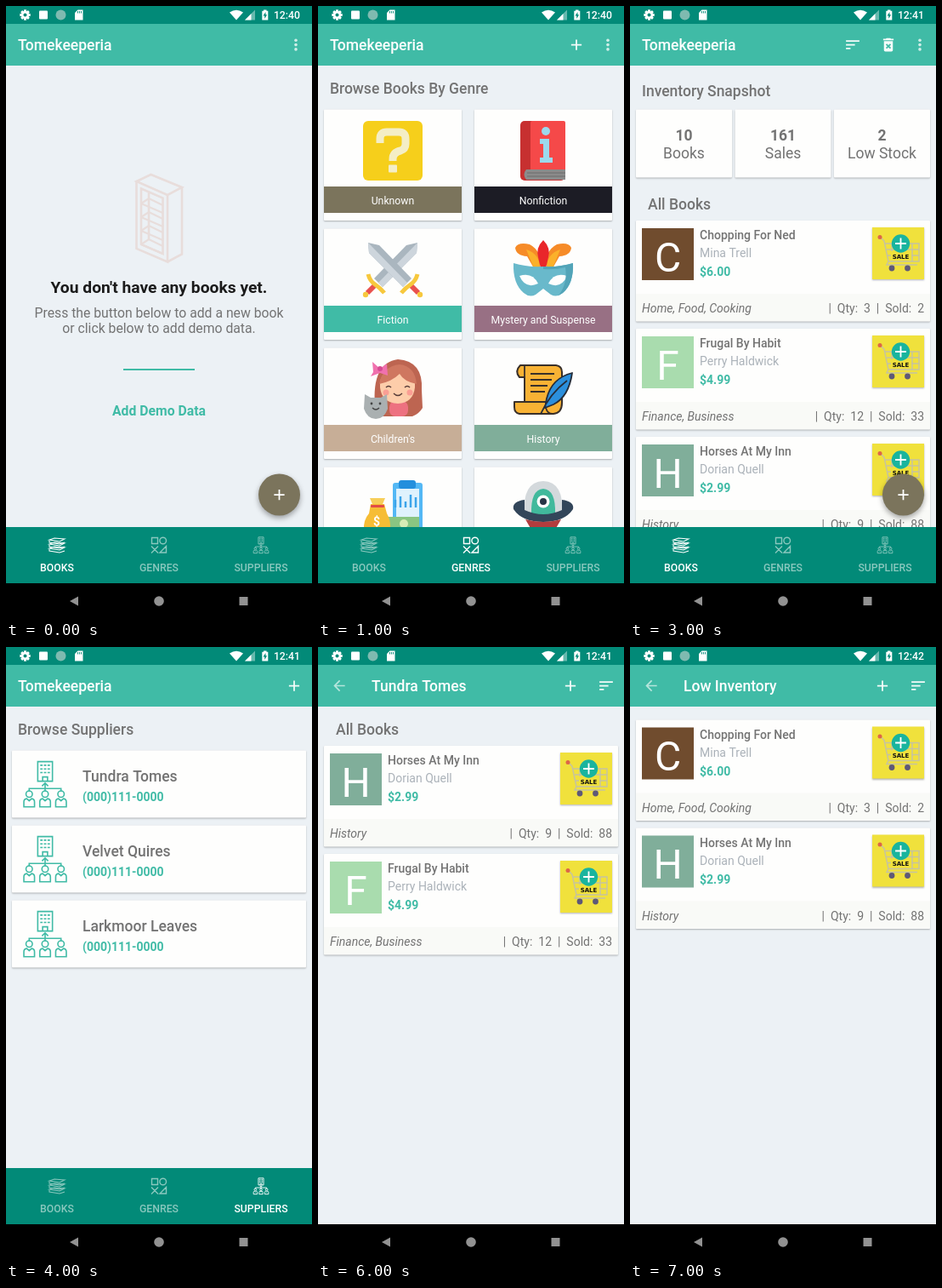
Write an HTML page with a canvas that moves like this. It is 360x720 px and loops after 8000 ms.

```html
<!DOCTYPE html>
<html lang="en">
<head>
<meta charset="utf-8">
<title>Book inventory app</title>
<style>
html, body { margin: 0; width: 100%; height: 100%; overflow: hidden; background: #000; }
canvas { display: block; width: 360px; height: 720px; }
</style>
</head>
<body>
<canvas id="stage"></canvas>
<script>
const W = 360, H = 720, SCREEN_MS = 1000;
const TEAL = '#40bba6', DARK = '#028a78', BG = '#ecf1f5', CARD = '#fefefd';
const GREY = '#737373', PALE = '#abb2b9', INK = '#1b1b1b', BLUSH = '#e8dddb', OLIVE = '#7b745c';
const APP = 'Tomekeeperia', SUPPLIER = 'Tundra Tomes', PHONE = '(000)111-0000';

const canvas = document.getElementById('stage');
const ctx = canvas.getContext('2d');
const dpr = window.devicePixelRatio || 1;
canvas.width = W * dpr;
canvas.height = H * dpr;

const ICONS = {
  add: 'M19 13h-6v6h-2v-6H5v-2h6V5h2v6h6z',
  sort: 'M3 18h6v-2H3zM3 6v2h18V6zM3 13h12v-2H3z',
  trash: 'M6 19c0 1.1.9 2 2 2h8c1.1 0 2-.9 2-2V7H6v12zm2.46-7.12l1.41-1.41L12 12.59l2.12-2.12 1.41 1.41L13.41 14l2.12 2.12-1.41 1.41L12 15.41l-2.12 2.12-1.41-1.41L10.59 14zM15.5 4l-1-1h-5l-1 1H5v2h14V4z',
  back: 'M20 11H7.83l5.59-5.59L12 4l-8 8 8 8 1.41-1.41L7.83 13H20z',
  phone: 'M6.62 10.79c1.44 2.83 3.76 5.14 6.59 6.59l2.2-2.2c.27-.27.67-.36 1.02-.24 1.12.37 2.33.57 3.57.57.55 0 1 .45 1 1V20c0 .55-.45 1-1 1-9.39 0-17-7.61-17-17 0-.55.45-1 1-1h3.5c.55 0 1 .45 1 1 0 1.25.2 2.45.57 3.57.11.35.03.74-.25 1.02z',
  update: 'M21 10.12h-6.78l2.74-2.82c-2.73-2.7-7.15-2.8-9.88-.1-2.73 2.71-2.73 7.08 0 9.79s7.15 2.71 9.88 0C18.32 15.65 19 14.08 19 12.1h2c0 1.98-.88 4.55-2.64 6.29-3.51 3.48-9.21 3.48-12.72 0-3.5-3.47-3.53-9.11-.02-12.58s9.14-3.47 12.65 0L21 3zM12.5 8v4.25l3.5 2.08-.72 1.21L11 13V8z',
  list: 'M3 13h2v-2H3zm0 4h2v-2H3zm0-8h2V7H3zm4 4h14v-2H7zm0 4h14v-2H7zM7 7v2h14V7z',
  info: 'M11 17h2v-6h-2zM12 2a10 10 0 100 20 10 10 0 000-20zm0 18a8 8 0 110-16 8 8 0 010 16zM11 9h2V7h-2z'
};

function rect(x, y, w, h, color, r = 0) {
  ctx.fillStyle = color;
  ctx.beginPath();
  ctx.roundRect(x, y, w, h, r);
  ctx.fill();
}
function disc(x, y, r, color) {
  ctx.fillStyle = color;
  ctx.beginPath();
  ctx.arc(x, y, r, 0, 7);
  ctx.fill();
}
function fill(d, color) {
  ctx.fillStyle = color;
  ctx.fill(new Path2D(d), 'evenodd');
}
function line(d, color, width) {
  ctx.strokeStyle = color;
  ctx.lineWidth = width;
  ctx.stroke(new Path2D(d));
}
function at(x, y, scale, draw, scaleY = scale) {
  ctx.save();
  ctx.translate(x, y);
  ctx.scale(scale, scaleY);
  draw();
  ctx.restore();
}
function mirrored(axis, draw) {
  draw();
  at(axis * 2, 0, -1, draw, 1);
}
function icon(name, x, y, color, size = 21) {
  at(x - size / 2, y - size / 2, size / 24, () => fill(ICONS[name], color));
}
function text(s, x, y, size, weight, color, align = 'left') {
  ctx.font = `${weight} ${size}px Roboto, sans-serif`;
  ctx.fillStyle = color;
  ctx.textAlign = align;
  ctx.fillText(s, x, y);
  return ctx.measureText(s).width;
}
// Alternates plain and accented runs on one line.
function runs(parts, y, accent) {
  let x = 21;
  parts.forEach((s, i) => { x += text(s, x, y, 15.75, i % 2 ? accent : '400', GREY); });
}
function shadowed(blur, dy, alpha, draw) {
  ctx.save();
  ctx.shadowColor = `rgba(0,0,0,${alpha})`;
  ctx.shadowBlur = blur * dpr;
  ctx.shadowOffsetY = dy * dpr;
  draw();
  ctx.restore();
}
function card(x, y, w, h) {
  shadowed(2, 1, 0.28, () => rect(x, y, w, h, CARD, 1));
}
const heading = (s, x, y) => text(s, x, y, 17.5, '500', GREY);

function person(x, y, s, color, width) {
  at(x, y, s, () => line('M9 0A9 9 0 11-9 0A9 9 0 119 0M-15 36V22q0-8 8-9l7 6 7-6q8 1 8 9v14z', color, width / s));
}
function network(x, y, s, color, width) {
  at(x, y, s, () => {
    line('M-12-36h24v32h-24zM-4-4v-7h8v7M-26 13V8h52v5M0 13V0M-5 4l5-5 5 5', color, width / s);
    for (const row of [-30, -24, -18]) line(`M-8 ${row}h4m2 0h4m2 0h4`, color, width / s);
    for (const px of [-26, 0, 26]) person(px, 17, 0.58, color, width / s);
  });
}

function statusBar(clock) {
  rect(0, 0, W, 21, DARK);
  for (let i = 0; i < 8; i++) {
    ctx.save();
    ctx.translate(22.5, 10.5);
    ctx.rotate(i * Math.PI / 4);
    rect(-1.5, -6.2, 3, 3, '#fff');
    ctx.restore();
  }
  disc(22.5, 10.5, 4.7, '#fff');
  disc(22.5, 10.5, 2, DARK);
  rect(39, 5.5, 10, 10, '#fff', 1);
  disc(64.5, 10.5, 6, '#7fbab0');
  fill('M84.5 4.5h6v12h-9.5v-8.5z', '#fff');
  line('M84.5 6v2.5m2-2.5v2.5m2-2.5v2.5', DARK, 0.9);
  fill('M263 7.5q8-5.5 16 0l-8 9z', '#fff');
  fill('M293 4.5v12h-12z', 'rgba(255,255,255,.4)');
  fill('M288.5 9v7.5H281z', '#fff');
  fill('M303 4.5h3.5v1.2h1.8v10.8h-7V5.7h1.7z', '#fff');
  fill('M305.5 7l-3 4.5h1.8v3.5l2.8-4.7h-1.7z', DARK);
  text(clock, 346, 14.8, 12.25, '500', '#fff', 'right');
}
function toolbar(title, actions, back) {
  rect(0, 21, W, 49, TEAL);
  if (back) icon('back', 25, 45.5, '#b5e5dc', 20);
  text(title, back ? 63 : 14, 52, 17.5, '500', '#fff');
  for (const [name, x] of actions) {
    if (name === 'dots') for (const y of [40.3, 45.6, 50.9]) disc(341, y, 1.8, '#d0eee8');
    else icon(name, x, 45.5, '#f4fcfa');
  }
}
function tabs(active) {
  rect(0, 612, W, 66, DARK);
  ['BOOKS', 'GENRES', 'SUPPLIERS'].forEach((name, i) => {
    const x = 60 + i * 120, color = i === active ? '#fff' : '#8ac8be';
    if (i === 0) {
      for (const y of [627, 632, 637]) line(`M69 ${y - 1}l-12-1-6 2 12 2zM51 ${y}v3l12 2 6-2`, color, 1.1);
    } else if (i === 1) {
      line('M171.5 624.5h7v7h-7zM188.5 628a3.8 3.8 0 11-7.6 0a3.8 3.8 0 117.6 0M171 634.5l8 8m0-8l-8 8M188.5 634.5v7.5h-7.5z', color, 1.4);
    } else network(x, 633, 0.255, color, 0.9);
    text(name, x, 664, 12.25, '500', color, 'center');
  });
}
function systemBar() {
  rect(0, 678, W, 42, '#000');
  fill('M85 693.5v11l-10-5.5z', '#929292');
  disc(180, 699, 5.8, '#929292');
  rect(274.5, 694, 10, 10, '#929292');
}
function fab() {
  shadowed(6, 3, 0.35, () => disc(321.5, 574, 24.5, OLIVE));
  icon('add', 321.5, 574, '#fff');
}

function emptyBooks() {
  toolbar(APP, [['dots']]);
  line('M153.5 206l17-8 36.5 15-17 9zM153.5 206v79l36.5 15.5v-78.5M190 300.5l17-9V213M159 214.5l25.5 11v65.500l-25.500-11zM168 219v55', BLUSH, 2.6);
  for (const y of [232, 248, 264, 280]) line(`M159 ${y}l25.500 11M159 ${y}l9-6 16.500 8`, BLUSH, 2.2);
  text("You don't have any books yet.", 180, 336.7, 19.25, '700', INK, 'center');
  text('Press the button below to add a new book', 180, 365.5, 15.75, '400', GREY, 'center');
  text('or click below to add demo data.', 180, 384, 15.75, '400', GREY, 'center');
  rect(138, 426, 84, 2, TEAL);
  text('Add Demo Data', 180, 481, 15.75, '700', TEAL, 'center');
  fab();
  tabs(0);
}

const GENRES = [
  ['Unknown', OLIVE, () => {
    rect(53, 135, 70, 70, '#f6cf1b', 6);
    line('M73 161v-5q0-8 8-8h14q8 0 8 8v6q0 6-6 8-9 2-9 10v2', '#f4eec6', 9);
    rect(83, 186.500, 10, 9, '#f4eec6', 1);
  }],
  ['Nonfiction', '#1c1c25', () => {
    rect(238, 135, 53, 70, '#c73030', 5);
    rect(250, 135, 41, 60, '#f54949', 2);
    fill('M245 192h46v12h-46q-5-6 0-12z', '#8b8b8b');
    line('M246 196h45m-45 4h45', '#6d6d6d', 1);
    disc(268, 147, 5, '#9cd9ed');
    fill('M261 156h11v22h4v6h-15v-6h4v-16h-4z', '#9cd9ed');
  }],
  ['Fiction', TEAL, () => mirrored(88, () => {
    fill('M117 278l-1 12-40 40-10-10 38-39z', '#aab6bf');
    fill('M117 278l-1 12-40 40-5-5z', '#cdd5dc');
    line('M67 328l-9 9', '#e9514e', 6);
    line('M59 315q2 8 8 12t11 10', '#f7c83d', 5);
    disc(56, 339, 3.2, '#f7c83d');
  })],
  ['Mystery and Suspense', '#987084', () => {
    mirrored(265, () => {
      fill('M261 308q3-20-12-28-14-3-17 4 1 9 14 10l8 14z', '#f68b28');
      fill('M261 308q0-17-16-22l9 22z', '#fbb12b');
    });
    fill('M265 275q-9 9-6 20l3 13h6l3-13q3-11-6-20z', '#e9262a');
    fill('M230 302q16 5 35 4 19 1 35-4 1 24-12 35-7 6-14 2l-9-7-9 7q-7 4-14-2-13-11-12-35z', '#69b9cb');
    mirrored(265, () => fill('M237 317q15-5 22 9-15 7-22-9z', CARD));
    fill('M265 306q19 1 35-4 1 24-12 35l-5 3q11-14 8-33-12 3-26 2z', '#52a4b8');
  }],
  ["Children's", '#c7ae97', () => {
    fill('M67 470q-4-51 27-55 30 2 28 36l1 21q-4 7-12 10H74z', '#bd6551');
    rect(84, 464, 22, 18, '#ed7180', 7);
    fill('M73 441q4-14 21-15 18 1 20 16v6q-2 18-20 19-19-1-21-19z', '#fdcdaa');
    fill('M72 444q4-21 24-23 18 2 20 23-15-3-20-12-9 9-24 12z', '#cf7760');
    mirrored(94, () => { disc(80, 454, 3.5, '#fb9e94'); line('M80 448q3-3 6 0', '#553b38', 1.5); });
    line('M89 455q5 5 10 0', '#553b38', 1.5);
    fill('M73 426l-9-8 1 12-3 5 11-4 9 3-1-14z', '#f071ae');
    disc(73, 426, 3, '#d54a92');
    fill('M55 456l7 4h12l7-4 1 17q-4 12-14 12t-14-12z', '#aab0b1');
    mirrored(68, () => disc(63, 467, 1.4, '#444'));
    line('M64 472q4 4 8 0', '#444', 1.3);
  }],
  ['History', '#80ae9a', () => {
    ctx.lineJoin = 'round';
    const sheet = 'M238 422h42q7 1 7 8v36q0 12-10 13h-40q-6-1-6-8v-6h12v-29h-6q-6-7 1-14z';
    fill(sheet, '#f8b234');
    line(sheet, '#39302a', 2);
    line('M243 422v14m-12 29h37v7q2 7 8 7M250 432h28m-28 7h25m-25 7h20m-20 7h17', '#39302a', 1.8);
    const quill = 'M299 431q-24 6-30 30l-2 11 10-4q18-9 22-37z';
    fill(quill, '#2b8fdc');
    line(quill + 'M262 479q11-24 31-39', '#252d3a', 1.800);
  }],
  ['Finance', '#c7ae97', () => {
    rect(88, 560, 35, 60, '#54b8f5', 3);
    rect(92, 567, 27, 50, '#dff2fd');
    rect(95, 557, 20, 10, '#238fdd', 3);
    line('M91 589v-9m6 9v-13m6 13v-7m6 7v-15m6 15v-12', '#3ba4ea', 2.5);
    rect(83, 600, 36, 16, '#8ac582');
    disc(101, 608, 5, '#d7ecb6');
    fill('M62 585h16l3 11q5 8 4 20H54q-1-12 6-20z', '#f6bd35');
    fill('M61 578h18l-3 7H64z', '#f7ce59');
    rect(62, 586, 16, 3, '#e24c47', 1);
    text('$', 69, 610, 14, '700', '#fff', 'center');
  }],
  ['Science Fiction', '#1c1c25', () => {
    fill('M243 597q-3-38 22-39 25 1 22 39z', '#d4d9dc');
    fill('M251 597q-1-29 14-30 15 1 14 30z', '#41b99c');
    disc(265, 582, 7.500, '#fff');
    disc(265, 582, 4, '#273546');
    fill('M243 580q-15 2-13 11 10 15 35 15t35-15q2-9-13-11v12q-22 10-44 0z', '#33465a');
    fill('M244 603q21 6 42 0l-7 12h-28z', '#b23c3e');
  }]
];

function genres() {
  toolbar(APP, [['add', 304], ['dots']]);
  heading('Browse Books By Genre', 14, 103);
  GENRES.forEach(([name, color, draw], i) => {
    const x = i % 2 ? 184 : 7, y = 121.5 + 140 * (i >> 1);
    card(x, y, 162, 130.5);
    ctx.save();
    draw();
    ctx.restore();
    rect(x, y + 90.500, 162, 31, color);
    text(name, x + 81, y + 111, 12.25, '400', '#fff', 'center');
  });
  tabs(1);
}

function emptySuppliers() {
  toolbar(APP, [['add', 339]]);
  person(179.5, 255.5, 1, BLUSH, 3.5);
  person(143, 313, 1, BLUSH, 3.5);
  person(217, 313, 1, BLUSH, 3.5);
  line('M139 299q2-29 24-36M154 259l10 3-5 9M194 260q27 8 29 36M217 289l6 8 5-9M197 335q-17 5-33 1M171 330l-8 6 7 6', BLUSH, 3.5);
  text("You don't have any suppliers yet.", 180, 385, 19.25, '700', INK, 'center');
  text("Because you haven't entered any books", 180, 414, 15.75, '400', GREY, 'center');
  text('yet.', 180, 432.5, 15.75, '400', GREY, 'center');
  tabs(2);
}

const BOOKS = {
  C: ['Chopping For Ned', 'Mina Trell', '$6.00', 'Home, Food, Cooking', 3, 2, '#704c2e'],
  F: ['Frugal By Habit', 'Perry Haldwick', '$4.99', 'Finance, Business', 12, 33, '#a9dcae'],
  H: ['Horses At My Inn', 'Dorian Quell', '$2.99', 'History', 9, 88, '#80ae9a']
};

function saleButton() {
  shadowed(2, 1, 0.3, () => rect(285, 8, 61, 61, '#f0e13c'));
  line('M294 19l5 5 5 24h36V27h-41M302 34h38M303 41h37M308 27v21m8-21v21m8-21v21m8-21v21M304 48l-2 4h36', '#c6c3a0', 1.500);
  disc(294, 19.5, 2.5, '#dd6647');
  rect(307, 36, 24, 11, '#f0e13c');
  disc(308, 56, 3.4, '#5e5877');
  disc(326.5, 56, 3.4, '#5e5877');
  disc(318.5, 27, 10.7, '#19b49e');
  icon('add', 318.5, 27, '#fff', 22);
  ctx.font = 'bold 7px "DejaVu Sans", sans-serif';
  ctx.fillStyle = '#111';
  ctx.textAlign = 'center';
  ctx.fillText('SALE', 318.5, 44.8);
}
function bookCard(letter, top) {
  const [title, author, price, genre, qty, sold, color] = BOOKS[letter];
  at(0, top, 1, () => {
    card(7, 0, 346, 118.5);
    rect(7, 86, 346, 32, '#f9faf7');
    rect(14, 9, 61, 61, color);
    text(letter, 44.5, 59.5, 48, '400', '#fff', 'center');
    text(title, 82, 22, 14, '500', GREY);
    text(author, 82, 43, 14, '400', PALE);
    text(price, 82, 65, 14, '700', TEAL);
    text(genre, 14, 108, 14, 'italic 400', GREY);
    text(`|  Qty:  ${qty}  |  Sold:  ${sold}`, 346, 108, 14, '400', GREY, 'right');
    saleButton();
  });
}

function inventory() {
  toolbar(APP, [['sort', 262], ['trash', 304], ['dots']]);
  heading('Inventory Snapshot', 14, 106);
  [['10', 'Books'], ['161', 'Sales'], ['2', 'Low Stock']].forEach(([count, label], i) => {
    const x = 7 + i * 116.5;
    card(x, 121.5, 113, 80);
    text(count, x + 56.5, 158, 17.5, '700', GREY, 'center');
    text(label, x + 56.5, 178.5, 17.5, '400', GREY, 'center');
  });
  heading('All Books', 21, 239);
  ['C', 'F', 'H'].forEach((letter, i) => bookCard(letter, 252 + i * 127));
  fab();
  tabs(0);
}

function suppliers() {
  toolbar(APP, [['add', 339]]);
  heading('Browse Suppliers', 14, 103);
  [SUPPLIER, 'Velvet Quires', 'Larkmoor Leaves'].forEach((name, i) => {
    const y = 121.5 + i * 88;
    card(7, y, 346, 79);
    network(46, y + 39, 0.72, TEAL, 1.6);
    text(name, 90, y + 36, 17.5, '500', GREY);
    text(PHONE, 90, y + 59, 14, '700', TEAL);
  });
  tabs(2);
}

function supplierDetails() {
  toolbar('Supplier Details', [], true);
  for (const [top, bottom] of [[78, 229], [232, 313], [315.5, 456.5], [459.5, 509.5], [512.5, 670]])
    rect(7, top, 346, bottom - top, CARD);
  text(SUPPLIER, 180, 120, 26.25, '500', GREY, 'center');
  network(180, 178, 1, TEAL, 2.2);
  for (const [name, label, y] of [['phone', 'Call Supplier', 257.5], ['update', 'Latest Activity', 341],
    ['list', 'View Books From Supplier', 484.5], ['info', 'Helpful Tips', 537.5]]) {
    icon(name, 31.5, y, '#000');
    text(label, 56, y + 6.5, 17.5, '700', GREY);
  }
  text(PHONE, 56, 294, 17.5, '700', TEAL);
  const title = BOOKS.H[0];
  runs(['You recently purchased ', title], 390, 'italic 400');
  runs([`from ${SUPPLIER}. You've sold 88 copies of`], 408.5);
  runs(['', title, ' thus far, and you have 9'], 426.5, 'italic 400');
  runs(['copies remaining.'], 445);
  runs(['To call this supplier, click the phone number'], 586.500);
  runs(['listed above. To view all the books from this'], 605);
  runs(['supplier, click the text that says ', 'View Books'], 623, '700');
  runs(['', 'From Supplier', '.'], 641.5, '700');
}

function supplierBooks() {
  toolbar(SUPPLIER, [['add', 297], ['sort', 339]], true);
  heading('All Books', 21, 103);
  bookCard('H', 116);
  bookCard('F', 243);
}

function lowInventory() {
  toolbar('Low Inventory', [['add', 297], ['sort', 339]], true);
  bookCard('C', 85.5);
  bookCard('H', 212.5);
}

const SCREENS = [
  [emptyBooks, '12:40'], [genres, '12:40'], [emptySuppliers, '12:40'], [inventory, '12:41'],
  [suppliers, '12:41'], [supplierDetails, '12:41'], [supplierBooks, '12:41'], [lowInventory, '12:42']
];

function render() {
  const [draw, clock] = SCREENS[Math.floor(performance.now() / SCREEN_MS) % SCREENS.length];
  ctx.setTransform(dpr, 0, 0, dpr, 0, 0);
  rect(0, 0, W, H, BG);
  statusBar(clock);
  draw();
  systemBar();
  requestAnimationFrame(render);
}
render();
</script>
</body>
</html>
```
